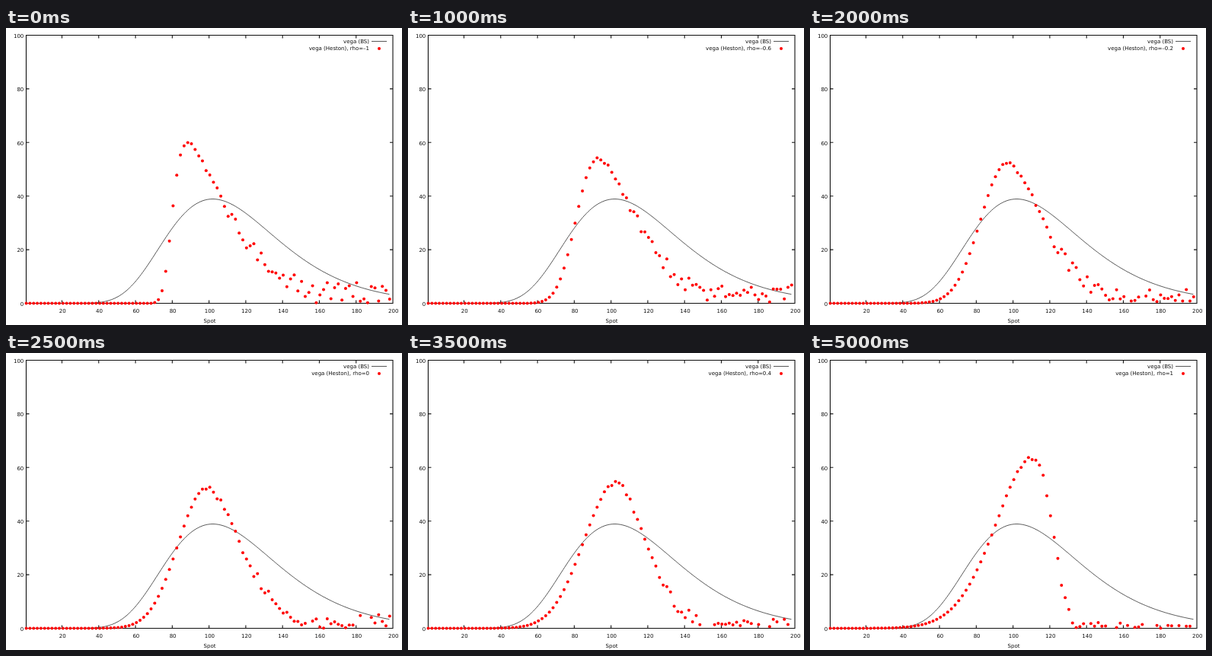
Recreate the animation shown at these times as an HTML page. Size 520 by 390 pixels, loop 5500 ms.

```html
<!DOCTYPE html>
<html lang="en">
<head>
<meta charset="utf-8">
<title>Vega against spot</title>
<style>
  html, body { margin: 0; width: 100%; height: 100%; overflow: hidden; background: #fff; }
  svg { display: block; width: 520px; height: 390px; }
  text { font: 7px "DejaVu Sans", sans-serif; fill: #111; }
  .end { text-anchor: end; }
  .mid { text-anchor: middle; }
  path { fill: none; stroke: #111; }
  .thin { stroke: #444; stroke-width: .9; }
  circle { fill: #f00; }
</style>
</head>
<body>
<svg viewBox="0 0 520 390">
  <path id="axes" stroke-width="1.1"/>
  <path id="curve" class="thin"/>
  <g id="labels"></g>
  <text class="mid" x="267.5" y="386.6">Spot</text>
  <text class="end" x="477" y="20">vega (BS)</text>
  <path class="thin" d="M480 17.5H500"/>
  <text class="end" x="477" y="29.3" id="key"></text>
  <circle cx="490" cy="27" r="2"/>
  <g id="dots"></g>
</svg>
<script>
const $ = id => document.getElementById(id);
const LEFT = 26.5, RIGHT = 508, TOP = 9.5, BOTTOM = 361.5;
const STEP_MS = 500, STEPS = 11, DOTS = 100;
const px = spot => 25.2 + 2.414 * spot;
const py = vega => BOTTOM - 3.52 * vega;

// A skewed bell: correlation moves the peak and steepens the side it leans to.
function heston(rho, i) {
  const peak = 49.5 + 5 * rho;
  const height = 52.5 + 1.8 * rho + 6 * rho ** 2 + 3 * rho ** 4;
  const rising = i < peak;
  const lean = rising ? -rho : rho;
  const width = (rising ? 11.2 : 13.3) - 4.2 * lean - 1.4 * lean ** 2;
  const power = (rising ? 2.1 : 1.65) + .7 * lean ** 3 + .4 * lean ** 4;
  const bell = height * Math.exp(-((Math.abs(i - peak) / width) ** power));
  return rising ? bell : Math.max(bell, 2.3 - 1.8 * rho);
}

// Sampling noise grows with spot and shrinks with correlation.
function noise(rho, i) {
  const s = Math.sin(rho * 64.949 + i * 78.233) * 43758.5453;
  const size = Math.min(2.8, Math.max(0, .1 * (i - 42))) * (1 - .4 * rho);
  return (2 * (s - Math.floor(s)) - 1) * size;
}

function drawChart() {
  let axes = `M${LEFT} ${TOP}H${RIGHT}V${BOTTOM}H${LEFT}Z`, labels = "";
  for (let v = 0; v <= 100; v += 20) {
    const y = py(v);
    axes += `M${LEFT} ${y}h4M${RIGHT} ${y}h-4`;
    labels += `<text class="end" x="23.3" y="${y + 3.3}">${v}</text>`;
  }
  for (let v = 20; v <= 200; v += 20) {
    const x = px(v);
    axes += `M${x} ${BOTTOM}v-4M${x} ${TOP}v4`;
    labels += `<text class="mid" x="${x + .8}" y="374">${v}</text>`;
  }
  $("axes").setAttribute("d", axes);
  $("labels").innerHTML = labels;

  const points = [];
  for (let s = 1; s <= 198.3; s += .9)
    points.push(`${px(s)} ${py(38.9 * Math.exp(-(Math.log(s / 102) ** 2) / .18))}`);
  $("curve").setAttribute("d", "M" + points.join("L"));
}

function drawStep(step) {
  const rho = (step - 5) / 5;
  $("key").textContent = `vega (Heston), rho=${rho < 0 ? "–" : ""}${Math.abs(rho)}`;
  let dots = "";
  for (let i = 0; i < DOTS; i++) {
    const vega = heston(rho, i) + noise(rho, i);
    if (vega >= 0) dots += `<circle cx="${26.6 + 4.82 * i}" cy="${py(vega)}" r="2"/>`;
  }
  $("dots").innerHTML = dots;
}

let shown = -1;
function tick() {
  const step = Math.floor(performance.now() / STEP_MS) % STEPS;
  if (step !== shown) drawStep(shown = step);
  requestAnimationFrame(tick);
}
drawChart();
tick();
</script>
</body>
</html>
```
